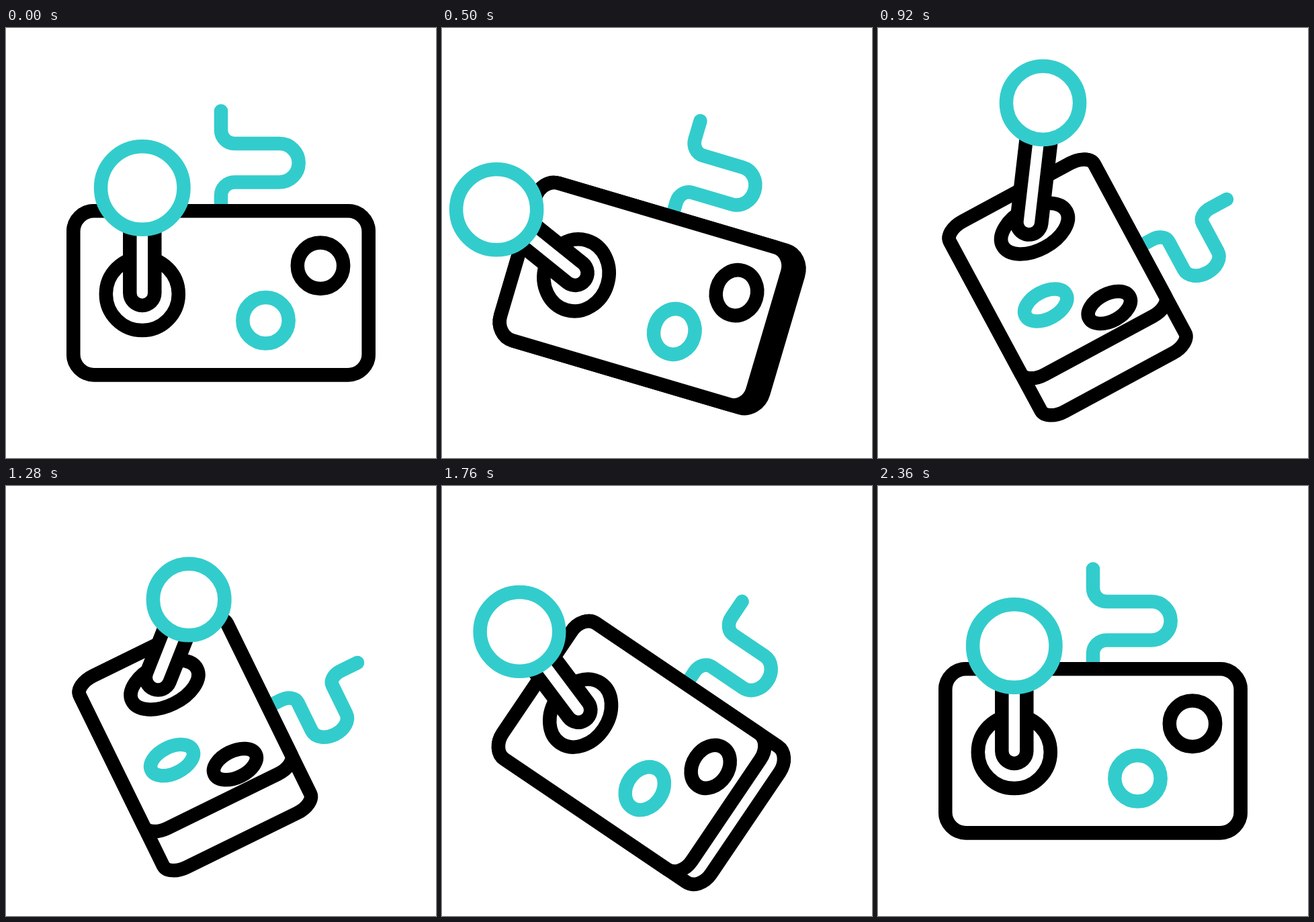
Write an HTML page with a canvas that moves like this. It is 640 px wide and 640 px high and loops after 2400 ms.

```html
<!DOCTYPE html>
<html>
<head>
<meta charset="utf-8">
<style>
  html, body { margin: 0; height: 100%; overflow: hidden; background: #fff; }
  canvas { display: block; }
</style>
</head>
<body>
<canvas width="640" height="640"></canvas>
<script>
const ctx = document.querySelector('canvas').getContext('2d');
const TEAL = '#33cccc', BLACK = '#000', WHITE = '#fff';
const LOOP = 2400, HALF = 1180, LINE = 20.5;
const CENTER = { x: 320, y: 394.25 };
const PIVOT = { x: 298.5, y: 374.25 };

const clamp = v => Math.min(1, Math.max(0, v));
const lerp = (a, b, k) => a + (b - a) * k;
const smooth = v => { v = clamp(v); return v * v * (3 - 2 * v); };

// Symmetric cubic-bezier(k, 0, 1 - k, 1)
function ease(v, k) {
  v = clamp(v);
  let lo = 0, hi = 1;
  for (let i = 0; i < 24; i++) {
    const m = (lo + hi) / 2, n = 1 - m;
    const x = 3 * n * n * m * k + 3 * n * m * m * (1 - k) + m * m * m;
    if (x < v) lo = m; else hi = m;
  }
  return smooth(lo);
}

// Stick angle relative to the body, in degrees
function stickAngle(t) {
  if (t < 650) return lerp(0, -71.5, ease(t / 650, .67));
  if (t < HALF) return lerp(-71.5, -40, ease((t - 650) / (HALF - 650), .5));
  if (t < 1666) return lerp(-40, -73, ease((t - HALF) / (1666 - HALF), .5));
  return lerp(-73, 0, ease((t - 1666) / (2360 - 1666), .5));
}

function paint(path, color, fill, width = LINE) {
  if (fill) { ctx.fillStyle = fill; ctx.fill(path); }
  ctx.strokeStyle = color;
  ctx.lineWidth = width;
  ctx.stroke(path);
}

function circle(x, y, r) {
  const path = new Path2D();
  path.arc(x, y, r, 0, Math.PI * 2);
  return path;
}

function roundRect(width) {
  const path = new Path2D();
  path.roundRect(100.3, 272.3, width, 243.9, 30.7);
  return path;
}

const cable = new Path2D('M320 123.6V152a20 20 0 0 0 20 20H407' +
  'a28.7 28.7 0 0 1 0 57.4H340a20 20 0 0 0-20 20V272');
const plate = roundRect(439.4);
const socket = circle(202.8, 396, 54);
const tealButton = circle(386.5, 435.3, 34.2);
const blackButton = circle(468, 353.7, 34.2);

function draw(t) {
  const phase = clamp(1 - Math.abs(t - HALF) / HALF);
  const p = ease(phase, .75);
  const q = smooth((phase - .2) / .8);
  const turn = p * 64.2;
  const squash = 1 - .428 * p;
  const depth = 65 * p;

  // Turns about the pivot and squashes along the body's length
  const bodyMatrix = (scale, shift) => new DOMMatrix()
    .translate(PIVOT.x, PIVOT.y)
    .rotate(turn)
    .translate(CENTER.x - PIVOT.x + shift * p, CENTER.y - PIVOT.y)
    .scale(scale, 1)
    .translate(-CENTER.x, -CENTER.y);
  const body = bodyMatrix(squash, -52.2);

  // Only the path is transformed, so the line weight stays constant
  function place(path, matrix = body) {
    const placed = new Path2D();
    placed.addPath(path, matrix);
    return placed;
  }

  ctx.fillStyle = WHITE;
  ctx.fillRect(0, 0, 640, 640);
  ctx.lineCap = 'round';

  paint(place(cable, bodyMatrix(1 - .3 * p, -22.7)), TEAL);
  paint(place(roundRect(439.4 + depth / squash)), BLACK, WHITE);
  paint(place(plate), BLACK, WHITE);
  paint(place(socket), BLACK);
  paint(place(tealButton), TEAL);
  paint(place(blackButton), BLACK);

  // Stick
  const foot = body.transformPoint({ x: 202.8, y: 396 });
  const x = foot.x - 10 * q, y = foot.y - 1.5 - 9.8 * q;
  const stretch = 57 * Math.sin(Math.PI * clamp((t - 660) / 420)) ** 2;
  const length = 156.5 - 32.8 * q + stretch;
  const lean = (turn + stickAngle(t)) * Math.PI / 180;
  const bx = x + length * Math.sin(lean), by = y - length * Math.cos(lean);
  const stem = new Path2D();
  stem.moveTo(x, y);
  stem.lineTo(bx, by);
  paint(stem, BLACK, null, 57.5);
  paint(stem, WHITE, null, 16.5);
  paint(circle(bx, by, 61.7 - 8.7 * q), TEAL, WHITE);
}

function tick() {
  draw(performance.now() % LOOP);
  requestAnimationFrame(tick);
}
tick();
</script>
</body>
</html>
```
